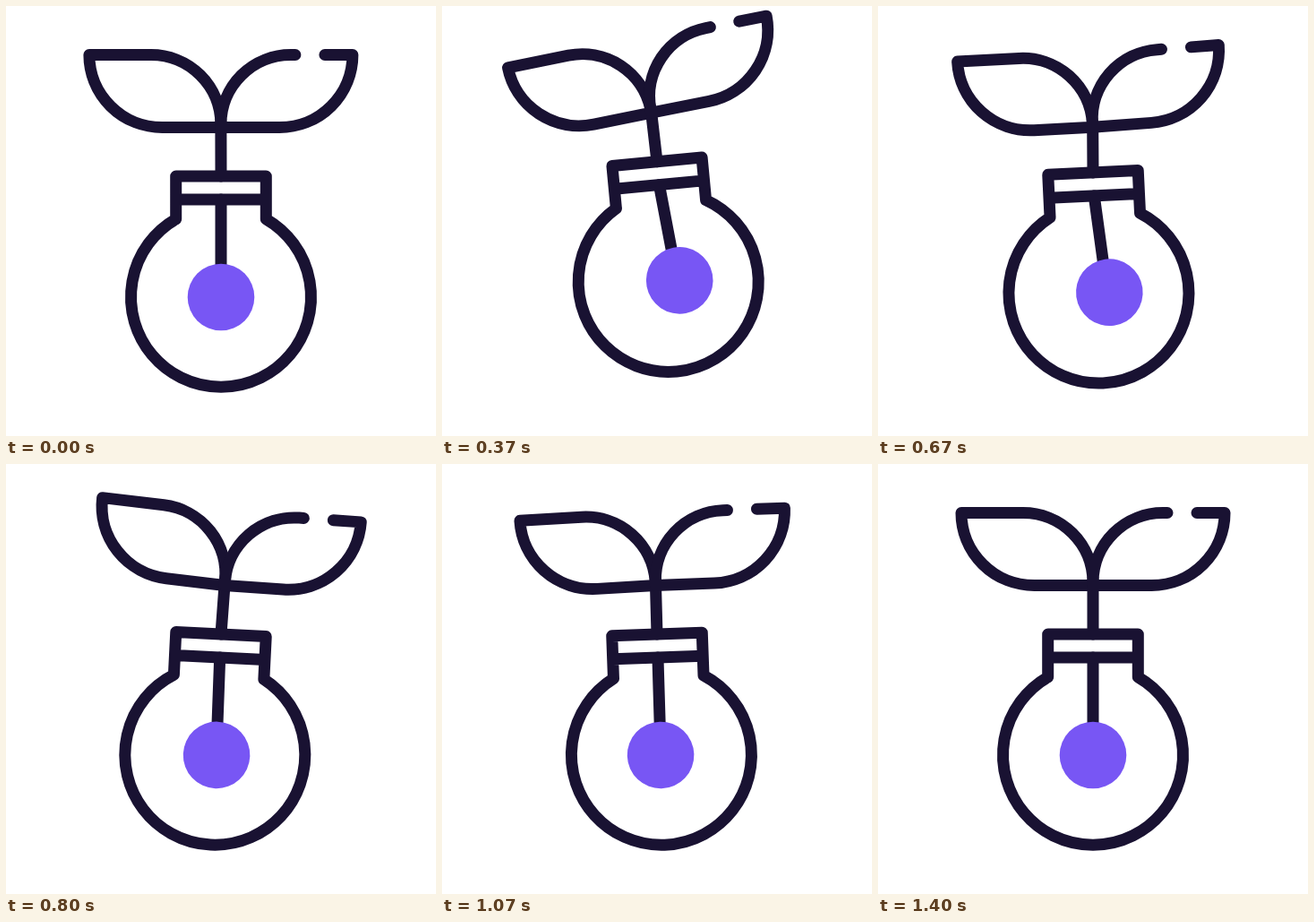
Animation of 480 by 480 pixels, one loop 1530 ms. Source, as an HTML page:

```html
<!DOCTYPE html>
<html lang="en">
<head>
<meta charset="utf-8">
<title>Sprouting bulb</title>
<style>
  html, body { margin: 0; width: 100%; height: 100%; overflow: hidden; background: #fff; }
  svg { display: block; width: 100vw; height: 100vh; }
</style>
</head>
<body>
<svg viewBox="0 0 480 480" fill="none" stroke="#191232" stroke-width="13" stroke-linecap="round" stroke-linejoin="round">
  <path id="stem"/>
  <path id="left" d="M240 135.500V132A78 78 0 0 0 162 54.500H93A81.500 81 0 0 0 174.500 135.500H240"/>
  <path id="right" d="M240 135.500V132A78 78 0 0 1 318 54.500H323M356 54.500H387A81.500 81 0 0 1 305.500 135.500H240"/>
  <path id="root" d="M240 216V310"/>
  <circle id="ball" cx="240" cy="325" r="37.300" fill="#7856f4" stroke="none"/>
  <path id="bulb" d="M189.700 237.800V190H290.300V237.800A100.500 100.500 0 1 1 189.700 237.800M190 216H290"/>
</svg>
<script>
const LOOP = 1530, LAST = 42;
const CAP = 190, RIM = 216, NODE = 135.5;
const el = id => document.getElementById(id);

// Sine ease from 0 to 1 between steps a and b.
function ease(n, a, b) {
  const u = Math.min(1, Math.max(0, (n - a) / (b - a)));
  return (1 - Math.cos(Math.PI * u)) / 2;
}

// Three swings with peaks a, b, c, then back to rest; lag delays the part.
function sway(n, lag, a, b, c) {
  const m = n - lag;
  return a * ease(m, 0, 12) + (b - a) * ease(m, 15, 26)
    + (c - b) * ease(m, 26, 33) - c * ease(n, 33 + lag, LAST);
}

const hop = (n, height, top, fall, land) => -height * (ease(n, 0, top) - ease(n, fall, land));

function place(id, x, y, angle, pivotY) {
  el(id).setAttribute('transform', `translate(${x} ${y}) rotate(${angle} 240 ${pivotY})`);
}

function draw(now) {
  // 30 steps per second on a 10 ms clock
  const n = Math.min(LAST, Math.floor((Math.floor(now % LOOP / 10) + 0.5) * 0.3));
  const lift = hop(n, 16.3, 10, 14, 23);
  const tilt = sway(n, 1, -5.8, 4.65, -3.65);
  const swing = sway(n, 1.5, -12, 6.3, -4.9);
  const nodeX = sway(n, -1, -6.3, 4.2, -1.5);
  const nodeY = hop(n, 16.3, 7, 14.5, 20.5);
  const rimX = -(RIM - CAP) * Math.sin(tilt * Math.PI / 180);

  place('bulb', 0, lift, tilt, CAP);
  place('ball', 0, lift, swing, CAP);
  place('root', rimX, lift, swing, RIM);
  place('left', nodeX, nodeY, sway(n, 0, -11.6, 8.4, -4), NODE);
  place('right', nodeX, nodeY, sway(n, 0, -11.4, 5.3, -2.5), NODE);
  el('stem').setAttribute('d', `M240 ${CAP + lift}L${240 + nodeX} ${NODE + nodeY}`);
}

const start = performance.now();
function tick() {
  draw(performance.now() - start);
  requestAnimationFrame(tick);
}
tick();
</script>
</body>
</html>
```
